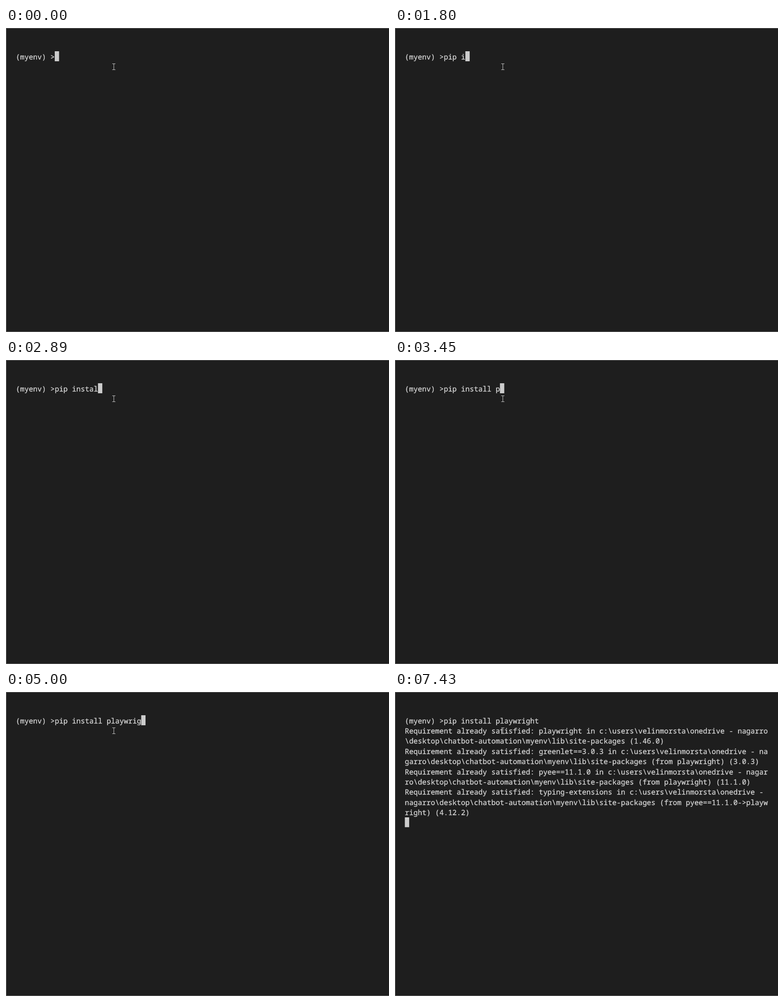
Write an HTML page that moves like this. It is 840x667 px and loops after 8 s.

```html
<!DOCTYPE html>
<html lang="en">
<head>
<meta charset="utf-8">
<title>Terminal</title>
<style>
  html, body { margin: 0; width: 100%; height: 100%; overflow: hidden; background: #1e1e1e; }
  #stage { position: relative; width: 840px; height: 667px; background: #1e1e1e; overflow: hidden; }
  #stage > * { position: absolute; }
  #frame { inset: 0; border: 1px solid #686868; border-right: 0; }
  #screen {
    left: 21.6px; top: 51.5px; margin: 0; color: #d6d6d6;
    font: 15.8px/22.4px "Noto Sans Mono", "DejaVu Sans Mono", monospace;
    -webkit-text-stroke: 0.3px #d6d6d6;
    font-variant-ligatures: none; text-rendering: geometricPrecision;
  }
  #overlay { inset: 0; }
  #pointer { left: 233px; top: 78px; mix-blend-mode: difference; }
</style>
</head>
<body>
<div id="stage">
  <div id="frame"></div>
  <pre id="screen"></pre>
  <svg id="overlay" width="840" height="667"><rect id="cursor" fill="#ccc"/></svg>
  <svg id="pointer" width="7" height="14" shape-rendering="crispEdges">
    <path d="M0 0h7v1H4v12h3v1H0v-1h3V1H0z" fill="#e6e6e6"/>
  </svg>
</div>
<script>
const LOOP = 8000, COLUMNS = 84;
const CELL = { left: 21.6, top: 51, width: 9.48, height: 22.36 };
const CURSOR_HEIGHT = 22;
const ENTER = 5720, OUTPUT = 7430;
const PROMPT = "(myenv) >", COMMAND = "pip install playwright";

// One time per typed character; the repeated time types two at once.
const KEY_TIMES = [900, 1020, 1300, 1430, 1800, 2080, 2200, 2480, 2740, 2890, 3050, 3050,
  3450, 3590, 3750, 4050, 4300, 4580, 4730, 5000, 5140, 5290];

const PATH = String.raw`c:\users\velinmorsta\onedrive - nagarro\desktop\chatbot-automation\myenv\lib\site-packages`;
const PACKAGES = [
  ["playwright", "(1.46.0)"],
  ["greenlet==3.0.3", "(from playwright) (3.0.3)"],
  ["pyee==11.1.0", "(from playwright) (11.1.0)"],
  ["typing-extensions", "(from pyee==11.1.0->playwright) (4.12.2)"],
];
const wrap = line => line.match(new RegExp(`.{1,${COLUMNS}}`, "g"));
const output = PACKAGES.flatMap(([name, detail]) =>
  wrap(`Requirement already satisfied: ${name} in ${PATH} ${detail}`));

const screenText = document.getElementById("screen");
const cursor = document.getElementById("cursor");

function linesAt(time) {
  const typed = KEY_TIMES.filter(key => key <= time).length;
  const lines = [PROMPT + COMMAND.slice(0, typed)];
  if (time >= OUTPUT) lines.push(...output);
  if (time >= ENTER) lines.push("");
  return lines;
}

function placeCursor(row, column) {
  const top = CELL.top + row * CELL.height, y = Math.round(top);
  const box = {
    x: CELL.left + column * CELL.width, y,
    width: CELL.width, height: top + CURSOR_HEIGHT - y,
  };
  for (const name in box) cursor.setAttribute(name, box[name]);
}

function draw() {
  const lines = linesAt(performance.now() % LOOP);
  const row = lines.length - 1;
  const text = lines.join("\n");
  if (screenText.textContent !== text) screenText.textContent = text;
  placeCursor(row, lines[row].length);
  requestAnimationFrame(draw);
}
draw();
</script>
</body>
</html>
```
